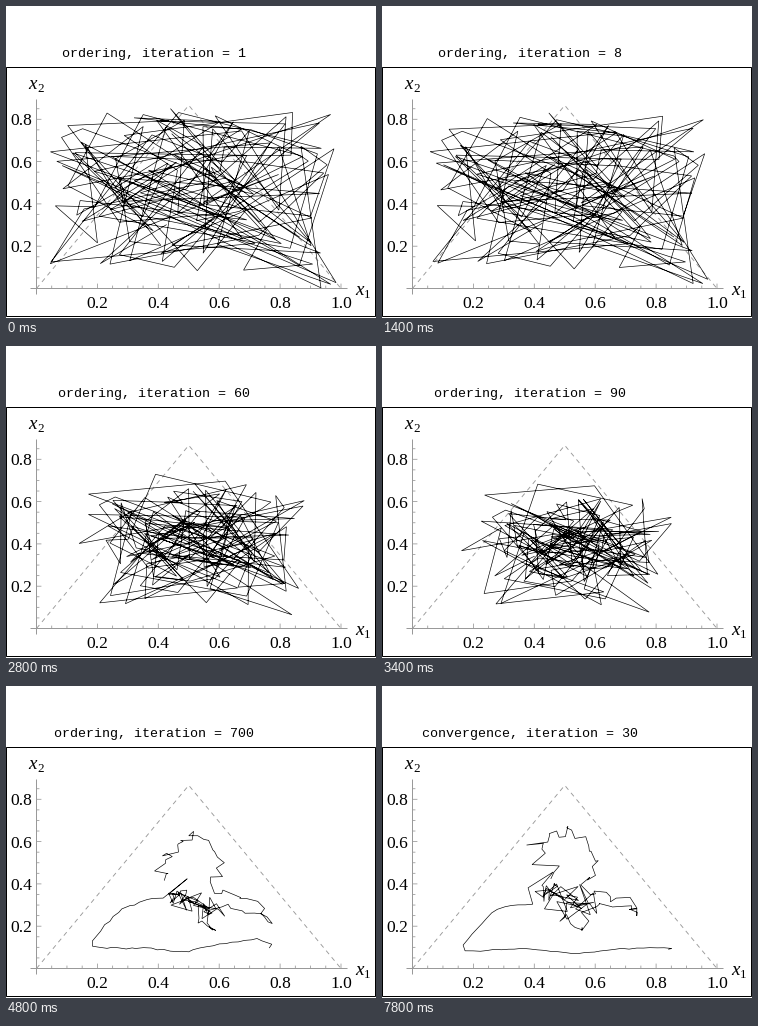
Recreate the animation shown at these times as a matplotlib script. Size 370 by 312 pixels, loop 8 s.

```python
import numpy as np
import matplotlib.pyplot as plt
from matplotlib.animation import FuncAnimation
from matplotlib.patches import Rectangle

W, H, DPI = 370, 312, 100
PT = 72 / DPI  # points per pixel
GRAY = "#999999"
X0, Y0, SX, SY = 30.5, 282.5, 304.5, 211.5

rng = np.random.default_rng(11)


def spread(points, count, sd):
    """Place nodes evenly along a polyline and roughen them."""
    p = np.array(points, float)
    dist = np.append(0, np.cumsum(np.hypot(*np.diff(p, axis=0).T)))
    t = np.linspace(0, dist[-1], count)
    nodes = np.column_stack([np.interp(t, dist, p[:, k]) for k in (0, 1)])
    return nodes + rng.normal(0, sd, nodes.shape) * (1, 0.65)


# Parts of the chain: node count, then roughness and path
# late in the ordering phase and in the convergence phase.
PARTS = [
    (44,  # outer loop
     1.8, [(226, 258), (224, 238), (197, 247), (165, 264), (118, 260),
           (92, 252), (103, 234), (128, 215), (140, 204)],
     0.4, [(286, 263), (291, 261), (240, 262), (195, 267), (140, 262),
           (84, 265), (80, 259), (110, 225), (125, 219), (150, 218)]),
    (44,  # tangled middle
     12, [(172, 216), (216, 231)],
     11, [(152, 202), (205, 218)]),
    (10,  # lower knot
     7, [(205, 225), (232, 250), (200, 240)],
     6, [(180, 222), (192, 248), (205, 236)]),
    (22,  # right branch
     4, [(215, 215), (250, 235), (280, 250), (250, 212), (210, 202)],
     5, [(205, 222), (235, 218), (262, 225), (235, 212), (205, 205)]),
    (30,  # upper loop
     7, [(207, 196), (215, 176), (188, 154), (172, 184), (140, 198)],
     5, [(205, 200), (212, 168), (188, 142), (152, 157), (170, 190)]),
]
N = sum(part[0] for part in PARTS)
RIM = PARTS[0][0]

ROUGH = np.vstack([spread(p, n, sd) for n, sd, p, _, _ in PARTS])
SETTLED = np.vstack([spread(p, n, sd) for n, _, _, sd, p in PARTS])
START = rng.uniform((42, 100), (330, 282), (N, 2))
RATE = rng.uniform(0.6, 1.5, (N, 1))

TENS = list(range(1, 11)) + list(range(20, 101, 10))
STEPS = [("ordering", n) for n in TENS + list(range(200, 1001, 100))]
STEPS += [("convergence", n) for n in TENS[:12]]


def pull(n):
    return 1 - np.exp(-RATE * (n / 150) ** 1.1)


def chain(i):
    phase, n = STEPS[i]
    noise = np.random.default_rng(100 + i).normal(0, 1, (N, 2))
    if phase == "convergence":
        noise[:RIM] = 0
        return SETTLED + 0.2 * noise
    if n <= 400:
        w = pull(n - 1) / pull(399)
        return START + w * (ROUGH - START) + noise * min(1, n / 20) * (1 - w)
    u = ((n - 400) / 600) ** 0.7
    return ROUGH + u * (SETTLED - ROUGH) + noise * (1 - u)


fig = plt.figure(figsize=(W / DPI, H / DPI), dpi=DPI, facecolor="white")
ax = fig.add_axes([0, 0, 1, 1])
ax.set_xlim(0, W)
ax.set_ylim(H, 0)
ax.axis("off")


def stroke(xs, ys, color=GRAY, width=1.0, **kw):
    return ax.plot(xs, ys, color=color, lw=width * PT, snap=False, **kw)[0]


def write(x, y, s, size, font="Liberation Serif", **kw):
    return ax.text(x, y, s, fontsize=size * PT, family=font, color="black",
                   va="baseline", **kw)


def variable(x, y, index):
    write(x, y, "x", 19, style="italic")
    write(x + 9, y + 3, index, 13)


ax.add_patch(Rectangle((0.5, 61.5), 369, 249, fill=False, ec="black",
                       lw=PT, snap=False))

stroke([X0, X0 + SX / 2, X0 + SX], [Y0, Y0 - SY * 0.866, Y0],
       "#999999", 0.9, dashes=(5, 4.5))

stroke([25, 341], [Y0, Y0])
stroke([X0, X0], [94, 288])
for k in range(1, 21):
    size = 2.5 if k % 4 else 4.5
    x, y = X0 + SX * k / 20, Y0 - SY * k / 20
    stroke([x, x], [Y0, Y0 - size], width=0.8)
    if k < 18:
        stroke([X0, X0 + size], [y, y], width=0.8)
    if k % 4 == 0:
        write(x, 302, f"{k / 20:.1f}", 17.5, ha="center")
        if k < 20:
            write(26.5, y + 6, f"{k / 20:.1f}", 17.5, ha="right")
variable(349, 289, "1")
variable(22, 83, "2")

line = stroke([], [], "black", 0.65, solid_joinstyle="miter", zorder=5)
title = write(148, 51, "", 13.33, "Liberation Mono", ha="center")


def update(i):
    w = chain(i)
    line.set_data(w[:, 0] + 0.5, w[:, 1] + 0.5)
    title.set_text("{}, iteration = {}".format(*STEPS[i]))
    return line, title


anim = FuncAnimation(fig, update, frames=len(STEPS), interval=200,
                     repeat=True, repeat_delay=0)
plt.show()
```
